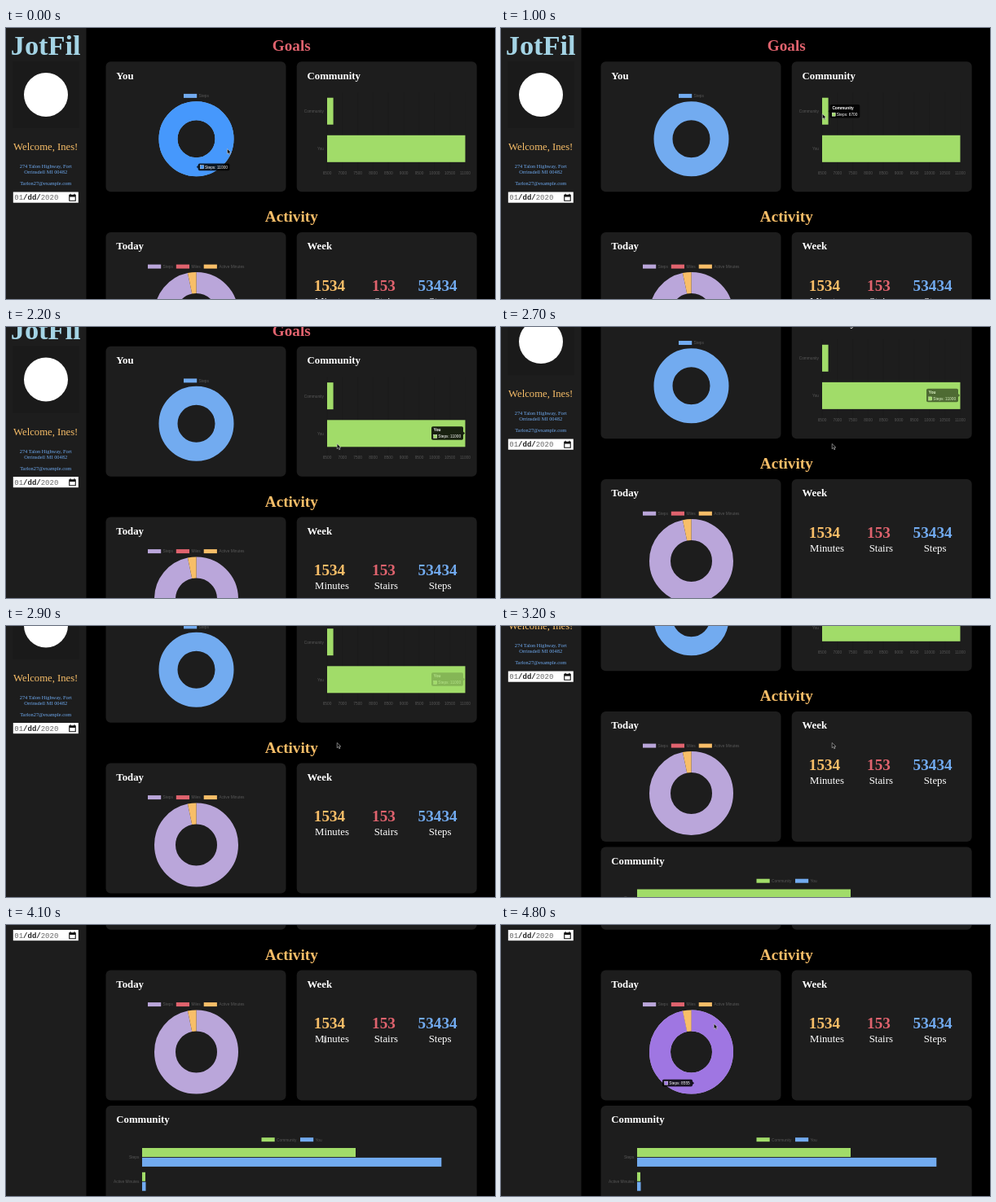
Recreate the animation shown at these times as an HTML page. Size 600 by 333 pixels, loop 5000 ms.

```html
<!DOCTYPE html>
<html lang="en">
<head>
<meta charset="utf-8">
<title>Fitness dashboard</title>
<style>
html, body { margin: 0; width: 100%; height: 100%; overflow: hidden; background: #000; }
svg { display: block; width: 600px; height: 333px; }
text { font-family: "Liberation Serif", "Times New Roman", serif; }
.brand { font-size: 34.4px; font-weight: bold; fill: #a4d4e5; }
.hello { font-size: 12.7px; fill: #f8be68; }
.info { font-size: 6.4px; fill: #6fabf2; }
.date { font: 9px "Liberation Mono", "Courier New", monospace; fill: #666; }
.date .on { font-weight: bold; fill: #222; }
.title { font-size: 19.2px; font-weight: bold; }
.head { font-size: 12.8px; font-weight: bold; fill: #fff; }
.unit { font-size: 12.8px; fill: #fff; }
.mid { text-anchor: middle; }
.end { text-anchor: end; }
.tiny { font: 4.8px "Liberation Sans", Arial, sans-serif; fill: #575757; }
.tip { font: 4.8px "Liberation Sans", Arial, sans-serif; fill: #fff; }
.bold { font-weight: bold; }
.card, .side { fill: #1d1d1d; }
.ring { fill: none; }
.red { fill: #e0636e; } .gold { fill: #f8be68; } .blue { fill: #72abf0; }
.green { fill: #a1dc69; } .lilac { fill: #baa6da; }
</style>
</head>
<body>
<svg viewBox="0 0 600 333">
  <rect width="600" height="333"/>
  <rect class="side" width="98.5" height="333"/>
  <g id="page">
    <text class="brand mid" x="48.7" y="32.6">JotFil</text>
    <rect x="8" y="41" width="82" height="82" fill="#1a1a1a"/>
    <circle cx="49" cy="82" r="27" fill="#fff"/>
    <text class="hello mid" x="48.7" y="150">Welcome, Ines!</text>
    <g class="mid">
      <text class="info" x="48.7" y="172">274 Talon Highway, Fort</text>
      <text class="info" x="48.7" y="179.3">Orrinsdell MI 00482</text>
      <text class="info" x="48.7" y="193.2">Tarlon27@example.com</text>
    </g>
    <rect x="8.8" y="201.5" width="80" height="13.2" fill="#fff"/>
    <text class="date" x="10.3" y="211.2">01<tspan class="on">/dd/</tspan>2020</text>
    <path d="M77.2 204.8h8.6v8h-8.6zM78.3 207.4v4.4h6.4v-4.4zM78.5 203.8h1.2v1h-1.2zM83.3 203.8h1.2v1h-1.2z" fill="#111" fill-rule="evenodd"/>

    <text class="title red mid" x="350.3" y="28.4">Goals</text>
    <text class="title gold mid" x="350.3" y="238.2">Activity</text>
    <g id="cards"></g>

    <circle class="ring" cx="233.5" cy="136.2" r="34.5" stroke="#72abf0" stroke-width="23"/>
    <circle class="ring" id="goalGlow" cx="233.5" cy="136.2" r="34.5" stroke="#4698fc" stroke-width="23"/>

    <g id="today" class="ring" transform="rotate(-90 233.5 351.5)" stroke-width="26"></g>
    <g id="charts"></g>
    <g id="week" class="mid"></g>
    <g id="tips"></g>
  </g>
  <path id="arrow" d="M0 0v6.2l1.5-1.3 1.1 2.4 1.1-.5-1.1-2.3h2z" fill="#000" stroke="#ddd" stroke-width=".55"/>
  <path id="beam" d="M-1.6-3.6q1.6 0 1.6 1v5.2q0 1-1.6 1M1.6-3.6q-1.6 0-1.6 1v5.2q0 1 1.6 1M-1 1h2" fill="none" stroke="#bbb" stroke-width=".8"/>
</svg>
<script>
const $ = id => document.getElementById(id);
const rect = (cls, x, y, w, h, rx = 0) =>
  `<rect class="${cls}" x="${x}" y="${y}" width="${w}" height="${h}" rx="${rx}"/>`;
const label = (cls, x, y, s) => `<text class="${cls}" x="${x}" y="${y}">${s}</text>`;
const legend = (cls, x, y, s) =>
  rect(cls, x, y - 2.6, 16.2, 5) + label('tiny', x + 18.6, y + 1.7, s);

const card = (x, y, w, h, name) =>
  rect('card', x, y, w, h, 6) + label('head', x + 12.8, y + 21.4, name);
$('cards').innerHTML =
  card(122.5, 41.2, 221, 160, 'You') + card(356.7, 41.2, 221, 160, 'Community') +
  card(122.5, 251, 221, 160, 'Today') + card(356.7, 251, 221, 160, 'Week') +
  card(122.5, 417.5, 455.2, 160, 'Community');

const slice = (color, size, start, id = '') =>
  `<circle id="${id}" cx="233.5" cy="351.5" r="38.5" pathLength="100" stroke="${color}"
    stroke-dasharray="${size} ${100 - size}" stroke-dashoffset="${-start}"/>`;
$('today').innerHTML = slice('#baa6da', 96.7, 0) +
  slice('#9f76e2', 96.7, 0, 'todayGlow') + slice('#f8be68', 3.3, 96.7);

let charts = legend('blue', 218, 83.5, 'Steps') +
  legend('lilac', 174, 293.2, 'Steps') + legend('red', 208.8, 293.2, 'Miles') +
  legend('gold', 242.7, 293.2, 'Active Minutes') +
  legend('green', 313.5, 459.3, 'Community') + legend('blue', 361, 459.3, 'You');
for (let i = 0; i < 10; i++) {
  const x = 394 + i * 18.83;
  charts += `<path d="M${x} 79v96" stroke="#000" stroke-opacity=".12" stroke-width=".6"/>` +
    label('tiny mid', x, 179.8, 6500 + i * 500);
}
charts += rect('green', 394, 85.7, 7.6, 33) + rect('green', 394, 131.8, 169.5, 33) +
  label('tiny end', 390, 104, 'Community') + label('tiny end', 390, 150.2, 'You') +
  rect('green', 167, 469.5, 262, 11) + rect('blue', 167, 481.4, 367.3, 11) +
  rect('green', 167, 499.3, 4, 11) + rect('blue', 167, 511.2, 4.5, 11) +
  label('tiny end', 163.3, 482.4, 'Steps') + label('tiny end', 163.3, 512.3, 'Active Minutes');
$('charts').innerHTML = charts;

const stat = (cls, x, n, ux, unit) =>
  label('title ' + cls, x, 322.7, n) + label('unit', ux, 339.5, unit);
$('week').innerHTML = stat('gold', 397, 1534, 400, 'Minutes') +
  stat('red', 463.5, 153, 466.3, 'Stairs') + stat('blue', 529.6, 53434, 532.6, 'Steps');

// Tooltip drawn from its top left corner; the caret points left or right.
function tooltip(w, h, color, value, leftCaret, title = '') {
  const y = h - 4.3, x = leftCaret ? 0 : w, d = leftCaret ? -2 : 2;
  return rect('box', 0, 0, w, h, 1.8) +
    `<path class="box" d="M${x} ${h / 2 - 2}l${d} 2l${-d} 2z"/>` +
    (title && label('tip bold', 2.8, 6.2, title)) +
    `<rect x="2.6" y="${y - 2.2}" width="4.2" height="4.2" fill="${color}" stroke="#fff" stroke-width=".4"/>` +
    label('tip', 8.2, y + 1.7, 'Steps: ' + value);
}
$('tips').innerHTML =
  `<g id="goalTip" transform="translate(235.8 166.4)">${tooltip(38.6, 8.8, '#4698fc', 11000, true)}</g>
   <g id="barTip"><g id="barA">${tooltip(36.7, 16.6, '#a1dc69', 6700, true, 'Community')}</g>
   <g id="barB">${tooltip(39, 16.6, '#a1dc69', 11000, false, 'You')}</g></g>
   <g id="todayTip" transform="translate(198 385.3)">${tooltip(37, 8.8, '#9f76e2', 8555, false)}</g>`;
for (const box of document.querySelectorAll('.box')) box.setAttribute('fill-opacity', .85);

// Value at time t along [time, value] points.
function track(t, points, ease = k => k) {
  if (t <= points[0][0]) return points[0][1];
  for (let i = 1; i < points.length; i++) {
    const [t0, a] = points[i - 1], [t1, b] = points[i];
    if (t <= t1) return a + (b - a) * ease((t - t0) / (t1 - t0));
  }
  return points[points.length - 1][1];
}
const smooth = k => k * k * (3 - 2 * k);
const outQuart = k => 1 - (1 - k) ** 4;
const move = (id, x, y) => $(id).setAttribute('transform', `translate(${x} ${y})`);
const fade = (id, o) => $(id).setAttribute('opacity', o);

function draw(t) {
  const scroll = track(t, [[2000, 0], [2200, 17.5], [2900, 82.5], [3200, 146], [3400, 186.2], [3600, 195.5]]);
  move('page', 0, -scroll);

  const x = track(t, [[100, 271.5], [900, 394.3], [1200, 394.3], [1700, 406.2], [4000, 406.2], [4500, 261.3]], smooth);
  const y = track(t, [[100, 148.5], [900, 105.5], [1200, 105.5], [1700, 143.5], [4000, 143.5], [4500, 121.3]], smooth);
  const overText = scroll > 165 && x > 378 && x < 421;
  move('arrow', x, y);
  move('beam', x, y);
  fade('arrow', overText ? 0 : 1);
  fade('beam', overText ? 1 : 0);

  const goal = track(t, [[200, 1], [500, 0]]);
  fade('goalTip', goal);
  fade('goalGlow', goal);

  const today = track(t, [[4300, 0], [4700, 1]]);
  fade('todayTip', today);
  fade('todayGlow', today);

  const onYou = t >= 1600;
  move('barTip', track(t, [[1500, 403.6], [1900, 522]], outQuart), track(t, [[1500, 94], [1900, 139.7]], outQuart));
  fade('barTip', track(t, [[600, 0], [900, 1], [2500, 1], [3000, 0]]));
  fade('barA', onYou ? 0 : 1);
  fade('barB', onYou ? 1 : 0);
}

const start = performance.now();
function loop() {
  const t = (performance.now() - start) % 5000;
  draw(Math.min(4800, Math.floor(t / 100) * 100));
  requestAnimationFrame(loop);
}
loop();
</script>
</body>
</html>
```
